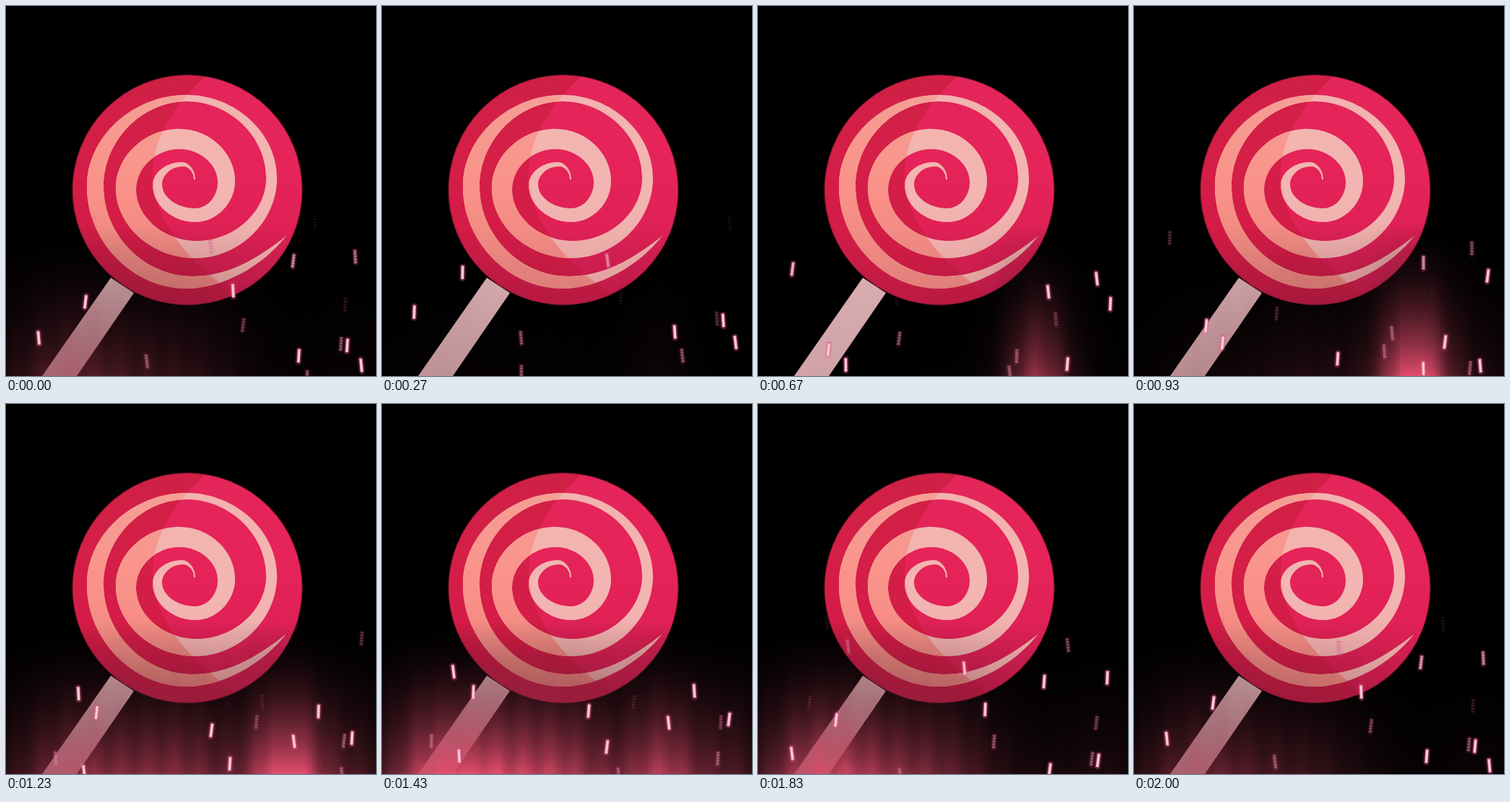
These frames come from a looping animation (512 px wide and 512 px high, 2030 ms). An HTML page with a canvas:

```html
<!DOCTYPE html>
<html lang="en">
<head>
<meta charset="utf-8">
<title>Lollipop with embers</title>
<style>
html, body { margin: 0; width: 100%; height: 100%; overflow: hidden; background: #000; }
canvas { display: block; width: 100vw; height: 100vh; }
</style>
</head>
<body>
<canvas id="stage" width="512" height="512"></canvas>
<script>
const SIZE = 512, LOOP = 2030, TAU = Math.PI * 2;
const ctx = document.getElementById('stage').getContext('2d');

// Both swirl edges wind through their top, left, bottom and right extremes
const OUTER = [[262, 240], [243, 216], [203, 248], [262, 299], [317, 242], [240, 170],
  [152, 252], [262, 349], [375, 238], [250, 123], [112, 250], [250, 391]];
const INNER = [[260, 240], [245, 222], [216, 247], [262, 280], [293, 244], [240, 198],
  [180, 254], [264, 325], [360, 238], [250, 132], [135, 250], [258, 374]];

// Floor lights that swell and fade once per loop
const LIGHTS = [
  { x: 80, spread: 110, peak: 1600, half: 900, power: 0.95 },
  { x: 250, spread: 115, peak: 1500, half: 1000, power: 0.75 },
  { x: 385, spread: 55, peak: 980, half: 1000, power: 0.9 },
  { x: 480, spread: 80, peak: 1400, half: 950, power: 0.5 }
];

// Birth time and x of the bright embers
const BRIGHT = [[-270, 403], [-390, 470], [-155, 490], [815, 398], [1080, 312], [1185, 109],
  [1555, 47], [325, 98], [500, 430], [780, 481], [695, 284], [510, 124]];
const DIM_COUNT = 10;

let seed = 7;
const random = () => (seed = seed * 16807 % 2147483647) / 2147483647;

const makeEmber = (birth, x, life, glow) => ({ birth, x, life, glow, phase: random() * TAU });
const embers = BRIGHT.map(([birth, x]) => makeEmber(birth, x, 1500, 1));
for (let i = 0; i < DIM_COUNT; i++) {
  embers.push(makeEmber(i * LOOP / DIM_COUNT, 10 + random() * 495, 950, 0.6));
}

function linear(c, x0, y0, x1, y1, ...colors) {
  const g = c.createLinearGradient(x0, y0, x1, y1);
  colors.forEach((col, i) => g.addColorStop(i / (colors.length - 1), col));
  return g;
}

// Quarter ellipses between neighbouring points, leaving vertically and horizontally in turn
function windThrough(path, points, vertical) {
  const k = 0.54;
  for (let i = 1; i < points.length; i++, vertical = !vertical) {
    const [x0, y0] = points[i - 1], [x1, y1] = points[i];
    const cx = vertical ? x0 : x1, cy = vertical ? y1 : y0;
    path.bezierCurveTo(x0 + (cx - x0) * k, y0 + (cy - y0) * k,
      x1 + (cx - x1) * k, y1 + (cy - y1) * k, x1, y1);
  }
}

function swirlPath() {
  const path = new Path2D();
  path.moveTo(...OUTER[0]);
  windThrough(path, OUTER, true);
  path.bezierCurveTo(300, 391, 355, 360, 388, 318);
  path.bezierCurveTo(345, 352, 305, 374, ...INNER[INNER.length - 1]);
  windThrough(path, [...INNER].reverse(), false);
  path.closePath();
  return path;
}

function makeLollipop() {
  const layer = document.createElement('canvas');
  layer.width = layer.height = SIZE;
  const c = layer.getContext('2d');

  c.fillStyle = linear(c, 160, 388, 75, 512, '#dfb2b5', '#dbabb1');
  c.fill(new Path2D('M145 376L177 397L98 512H50Z'));

  const disc = new Path2D(), swirl = swirlPath();
  disc.arc(251, 254.5, 159, 0, TAU);
  const shade = new Path2D('M278 95Q201 165 203 238Q208 325 322 402L300 430H60V80Z');

  c.save();
  c.clip(disc);
  c.fillStyle = linear(c, 0, 95, 0, 413, '#e3265a', '#e62459', '#e02156', '#c81c4c');
  c.fillRect(0, 0, SIZE, SIZE);
  c.fillStyle = linear(c, 0, 95, 0, 413, '#d02045', '#d41f47', '#d41c46', '#c41b45');
  c.fill(shade);
  c.fillStyle = linear(c, 0, 123, 0, 391, '#f3b3ae', '#f3b6b2', '#eeaaa8');
  c.fill(swirl);
  c.clip(swirl);
  c.fillStyle = linear(c, 0, 123, 0, 391, '#f59f95', '#fa9188', '#ea857f');
  c.fill(shade);
  c.restore();

  c.strokeStyle = 'rgba(110,18,45,.55)';
  c.lineWidth = 1.5;
  c.stroke(disc);
  return layer;
}

function pulse(t, peak, half) {
  const gap = Math.abs(t - peak), d = Math.min(gap, LOOP - gap);
  return d < half ? Math.cos(d / half * Math.PI / 2) ** 2 : 0;
}

function drawGlow(t) {
  const top = 300, width = 4, stops = 6;
  const levels = LIGHTS.map(l => l.power * pulse(t, l.peak, l.half));
  for (let x = 0; x < SIZE; x += width) {
    let power = 0.05;
    LIGHTS.forEach((l, i) => { power += levels[i] * Math.exp(-(((x - l.x) / l.spread) ** 2)); });
    power = Math.min(1, power * (1 + 0.04 * Math.sin(x * 0.17)));
    const g = ctx.createLinearGradient(0, top, 0, SIZE);
    for (let k = 0; k <= stops; k++) {
      const s = power * k / stops;
      g.addColorStop(k / stops, `rgba(${[225, 76, 108].map(v => Math.round(v * s))},${s})`);
    }
    ctx.fillStyle = g;
    ctx.fillRect(x, top, width, SIZE - top);
  }
}

function streak(length, width, color, alpha) {
  ctx.globalAlpha = alpha;
  ctx.strokeStyle = color;
  ctx.lineWidth = width;
  ctx.beginPath();
  ctx.moveTo(0, -length / 2);
  ctx.lineTo(0, length / 2);
  ctx.stroke();
}

function drawEmber({ birth, x, life, glow, phase }, t) {
  const age = ((t - birth + LOOP) % LOOP) * 0.94;
  if (age > life) return;
  const angle = phase + age / 240;
  const fade = glow * Math.min(1, (life - age) / 450);
  const y = 514 - 0.11 * age - 0.000027 * age * age;

  ctx.save();
  ctx.translate(x + Math.sin(angle) * 2.5, y);
  ctx.rotate(Math.cos(angle) * 0.13);
  ctx.lineCap = 'round';
  streak(16, 10, '#ff4f86', 0.14 * fade * fade);
  streak(16, 6.5, '#f0608f', 0.35 * fade * fade);
  ctx.lineCap = 'butt';
  ctx.setLineDash([2.5, 1.5]);
  streak(20, 4.5, '#a8577c', 0.85 * fade);
  ctx.setLineDash([]);
  streak(18, 3.5, '#ffc8d6', fade ** 3);
  ctx.restore();
}

const lollipop = makeLollipop();

function frame(now) {
  const t = now % LOOP;
  ctx.fillStyle = '#000';
  ctx.fillRect(0, 0, SIZE, SIZE);
  ctx.drawImage(lollipop, 0, 0);
  drawGlow(t);
  embers.forEach(ember => drawEmber(ember, t));
}

const start = performance.now();
function loop() {
  frame(performance.now() - start);
  requestAnimationFrame(loop);
}
loop();
</script>
</body>
</html>
```
